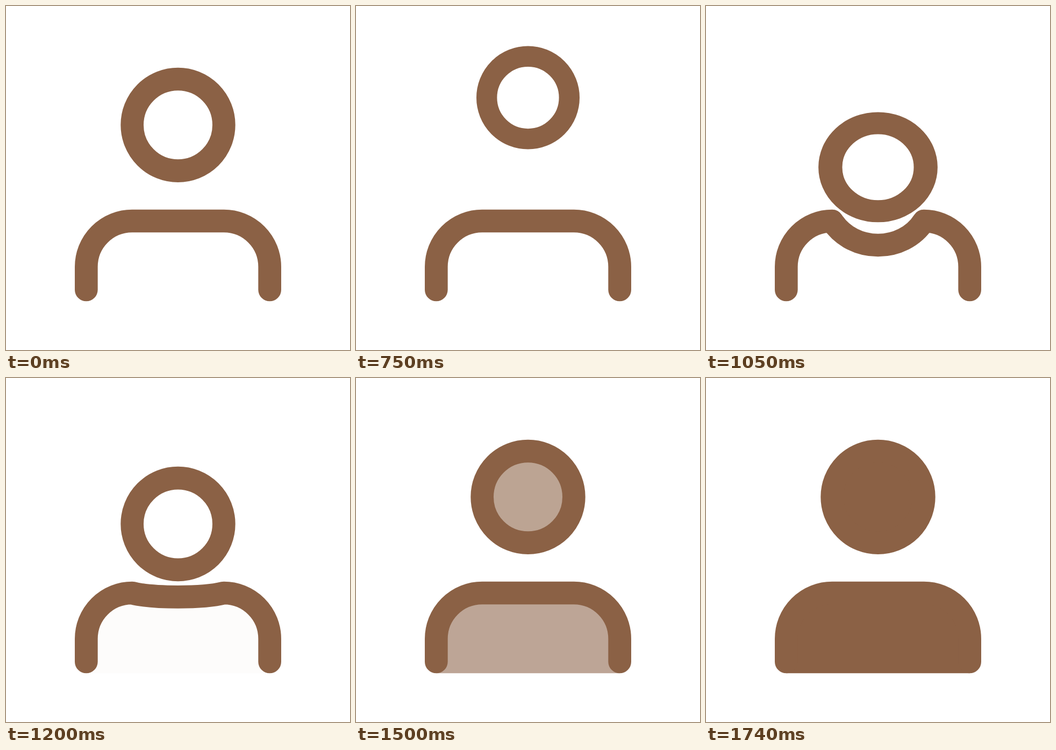
Write an HTML page that moves like this. It is 640 px wide and 640 px high and loops after 1.8 s.

```html
<!DOCTYPE html>
<html lang="en">
<head>
<meta charset="utf-8">
<title>User icon</title>
<style>
  html, body { margin: 0; width: 100%; height: 100%; overflow: hidden; background: #fff; }
  svg { display: block; width: 100vw; height: 100vh; }
  .line { fill: none; stroke: #8b6145; stroke-width: 42.667; stroke-linecap: round; stroke-linejoin: round; }
  .fill { fill: #8b6145; }
</style>
</head>
<body>
<svg viewBox="0 0 640 640">
  <path id="bodyFill" class="fill"/>
  <path id="bodyLine" class="line"/>
  <g id="head">
    <circle id="headFill" class="fill" r="85.333"/>
    <circle class="line" r="85.333"/>
  </g>
</svg>
<script>
  const LOOP = 1800;
  const el = id => document.getElementById(id);
  const head = el('head'), headFill = el('headFill');
  const bodyFill = el('bodyFill'), bodyLine = el('bodyLine');

  const ramp = (t, a, b) => Math.min(1, Math.max(0, (t - a) / (b - a)));
  const smooth = u => u * u * (3 - 2 * u);

  // Keys are [time, value] pairs, eased in and out between neighbours.
  function track(keys, t) {
    let v = keys[0][1];
    for (let i = 1; i < keys.length; i++) {
      const [a, from] = keys[i - 1], [b, to] = keys[i];
      if (t >= a) v = from + (to - from) * smooth(ramp(t, a, b));
    }
    return v;
  }

  const headY = [[420, 221.33], [750, 170.6], [990, 303.2], [1485, 221.33]];
  const scaleX = [[420, 1], [750, 0.9], [990, 1.1], [1095, 1]];
  const scaleY = [[420, 1], [750, 0.9], [990, 0.9], [1095, 1]];
  const dent = [[900, 0], [1020, 47], [1260, 0]];

  function shoulders(depth) {
    const y = 400 + depth / 0.75;
    return 'V485.33A85.33 85.33 0 0 1 234.67 400' +
      `C273.5 ${y} 366.5 ${y} 405.33 400` +
      'A85.33 85.33 0 0 1 490.67 485.33';
  }

  function draw(t) {
    const top = shoulders(track(dent, t));
    bodyLine.setAttribute('d', `M149.33 528${top}V528`);
    bodyFill.setAttribute('d', `M149.33 549.33${top}V549.33Z`);
    head.setAttribute('transform',
      `translate(320 ${track(headY, t)}) scale(${track(scaleX, t)} ${track(scaleY, t)})`);
    bodyFill.setAttribute('opacity', ramp(t, 1190, 1740));
    headFill.setAttribute('opacity', ramp(t, 1269, 1670));
  }

  const start = performance.now();
  function tick() {
    const t = (performance.now() - start + 1) % LOOP;
    const step = t < 1440 ? 30 : 60; // the closing fade runs at half rate
    draw(Math.floor(t / step) * step);
    requestAnimationFrame(tick);
  }
  tick();
</script>
</body>
</html>
```
